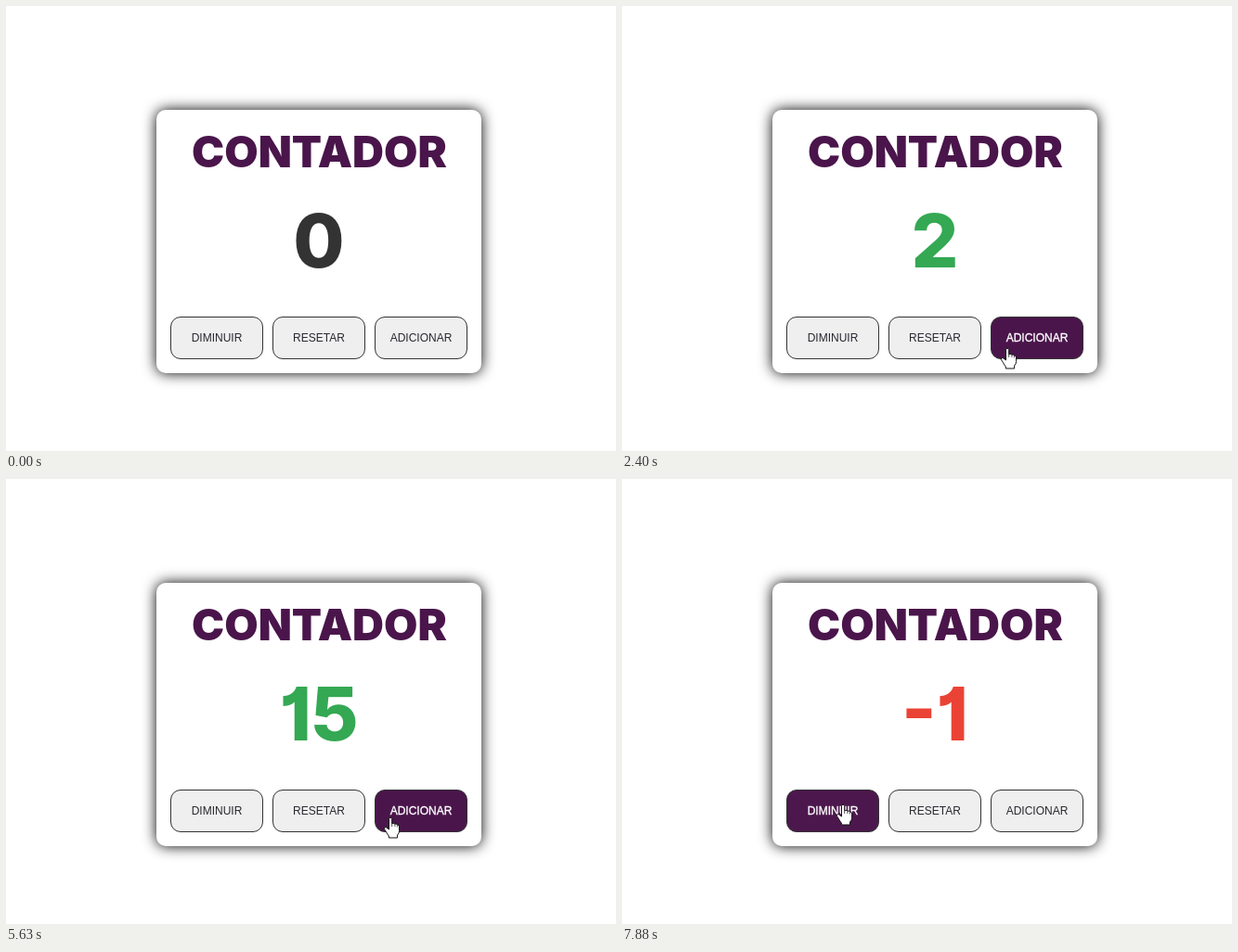
Write an HTML page that moves like this. It is 657x480 px and loops after 8 s.

```html
<!DOCTYPE html>
<html lang="pt">
<head>
<meta charset="utf-8">
<title>Contador</title>
<style>
  html, body { margin: 0; width: 100%; height: 100%; overflow: hidden; background: #fff; }
  svg { display: block; width: 657px; height: 480px; }
  text { text-anchor: middle; }
  .title { font: 900 47px Inter, sans-serif; fill: #4a154b; }
  .count { font: 800 80px Inter, sans-serif; font-feature-settings: "cv01"; }
  .label { font: 12px "Liberation Sans", Arial, sans-serif; }
  .shadow { filter: blur(7.5px); }
</style>
</head>
<body>
<svg viewBox="0 0 657 480">
  <rect class="shadow" x="162" y="112" width="350" height="284" rx="10"/>
  <rect x="162" y="112" width="350" height="284" rx="10" fill="#fff"/>
  <text class="title" x="337.5" y="174">CONTADOR</text>
  <text class="count" id="count" x="337" y="282"></text>
  <g id="buttons"></g>
  <g id="cursor">
    <circle id="press" r="12" fill="rgb(222,214,0)" fill-opacity=".6"/>
    <path id="arrow" fill="#fff" stroke="#111" d="M-.5 .5V16.5L3.2 13L5.7 18.6L8 17.6L5.6 12.2H10.6Z"/>
    <g id="hand" stroke="#111">
      <path fill="#fff" d="M-1.5 1.5Q-1.5 .3 0 .3T1.7 1.5V6.8Q3.2 5.6 4.9 7.2Q6.4 6.5 7.4 8Q9.6 7.6 9.6 10V14.5Q9.6 17 7.6 19V22H-1.7V20Q-3.5 18 -4.6 15.4L-6.7 12.4Q-7 10.2 -4.8 10.6L-1.5 13Z"/>
      <path fill="none" stroke-width=".7" d="M1.7 7V10M4.9 7.5V10M7.4 8.3V10.5"/>
    </g>
  </g>
</svg>
<script>
const LOOP = 8000, FADE = 300, LAG = 60, HOLD = 130;
const NS = "http://www.w3.org/2000/svg";
const $ = id => document.getElementById(id);

// pointer moves: from, until, x, y
const entry = [556, 470];
const moves = [
  [190, 760, 218, 369], [1030, 1290, 391, 374], [1290, 1430, 412, 372],
  [2250, 2400, 415, 369], [2400, 2700, 414, 365], [5640, 5980, 245, 358],
  [6150, 6400, 320, 359], [7465, 7640, 238, 351]
];

// each run of clicks: first press, period, count, effect on the value
const runs = [
  [1710, 410, 4, v => v + 1], [3410, 180, 6, v => v + 1], [4700, 200, 5, v => v + 1],
  [7070, 0, 1, () => 0], [7750, 0, 1, v => v - 1]
];
const clicks = runs.flatMap(([first, period, count, apply]) =>
  Array.from({ length: count }, (_, i) => ({ at: first + period * i, apply })));

const clamp = v => Math.max(0, Math.min(1, v));
const mix = (a, b, p) => `rgb(${a.map((v, i) => Math.round(v + (b[i] - v) * p))})`;

function pointer(t) {
  let [x, y] = entry;
  for (const [from, until, toX, toY] of moves) {
    const p = clamp((t - from) / (until - from));
    x += (toX - x) * p;
    y += (toY - y) * p;
  }
  return [x, y];
}

function add(parent, tag, attrs) {
  const node = document.createElementNS(NS, tag);
  for (const key in attrs) node.setAttribute(key, attrs[key]);
  return parent.appendChild(node);
}

const buttons = ["DIMINUIR", "RESETAR", "ADICIONAR"].map((label, i) => {
  const x = 177 + 110 * i, g = $("buttons");
  const box = add(g, "rect", { x: x + .5, y: 335.5, width: 99, height: 45, rx: 10.5, stroke: "#333" });
  const text = add(g, "text", { class: "label", x: x + 50, y: 362 });
  text.textContent = label;
  return { x, box, text, hover: [] };
});

const over = (b, [x, y]) => x >= b.x && x <= b.x + 100 && y >= 335 && y <= 381;
const onButton = pos => buttons.some(b => over(b, pos));

// collect the spans in which the pointer rests on each button
for (const b of buttons) {
  let span = null;
  for (let t = 0; t <= LOOP; t += 5) {
    if (!over(b, pointer(t - LAG))) span = null;
    else if (span) span[1] = t;
    else b.hover.push(span = [t, t]);
  }
}

// cubic-bezier(.25, .1, .25, 1)
function ease(x) {
  x = clamp(x);
  let lo = 0, hi = 1;
  for (let i = 0; i < 20; i++) {
    const m = (lo + hi) / 2, n = 1 - m;
    if (.75 * n * m + m ** 3 < x) lo = m; else hi = m;
  }
  const n = 1 - lo;
  return .3 * n * n * lo + 3 * n * lo * lo + lo ** 3;
}

const level = (hover, t) => Math.max(0, ...hover.map(([from, to]) =>
  ease((Math.min(t, to) - from) / FADE) * (1 - ease((t - to) / FADE))));

const show = (id, on) => $(id).setAttribute("visibility", on ? "visible" : "hidden");

function draw(t) {
  for (const b of buttons) {
    const p = level(b.hover, t), ink = mix([40, 40, 48], [255, 255, 255], p);
    b.box.setAttribute("fill", mix([239, 239, 239], [74, 21, 75], p));
    b.text.setAttribute("fill", ink);
    b.text.setAttribute("stroke", ink);
    b.text.setAttribute("stroke-width", .35 * p);
  }
  const value = clicks.reduce((v, c) => t >= c.at + HOLD ? c.apply(v) : v, 0);
  $("count").textContent = value;
  $("count").setAttribute("fill", value > 0 ? "#34a853" : value < 0 ? "#ea4335" : "#333");

  const pos = pointer(t), seen = t >= 190;
  const hand = onButton(pos) && onButton(pointer(t - LAG));
  $("cursor").setAttribute("transform", `translate(${pos.map(Math.round)})`);
  show("arrow", seen && !hand);
  show("hand", seen && hand);
  show("press", clicks.some(c => t >= c.at && t < c.at + HOLD));
}

const start = performance.now();
function tick() {
  draw((performance.now() - start) % LOOP);
  requestAnimationFrame(tick);
}
tick();
</script>
</body>
</html>
```
